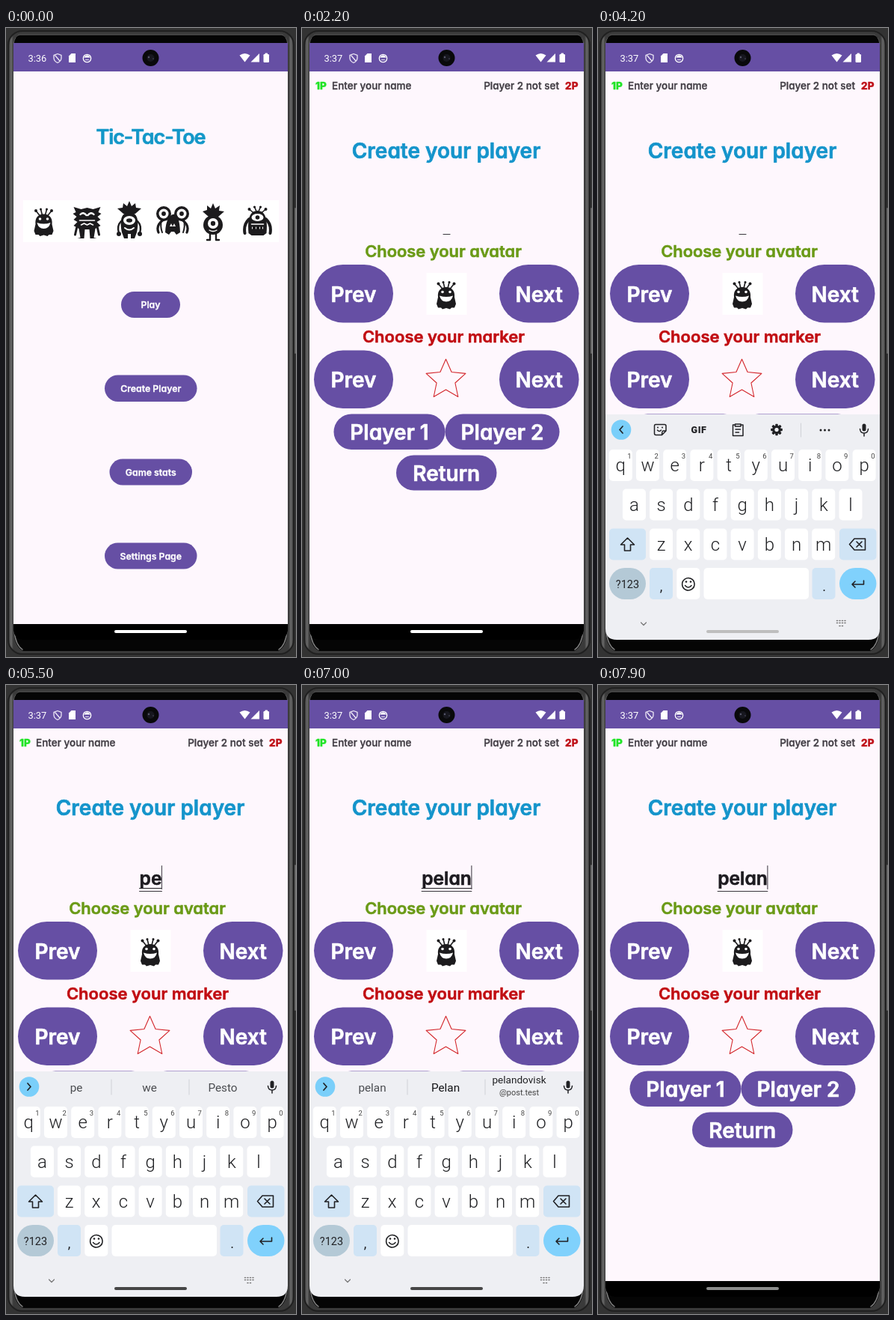
An HTML page for the animation above (8 s loop, 388 px wide and 840 px high).

```html
<!DOCTYPE html>
<html lang="en">
<head>
<meta charset="utf-8">
<title>Tic-Tac-Toe player setup</title>
<style>
html, body { margin: 0; width: 100%; height: 100%; overflow: hidden; background: #333; }
svg { display: block; width: 388px; height: 840px; }
text { white-space: pre; }
.cute { font-family: Inter, "Open Sans", sans-serif; font-weight: 600; font-feature-settings: "cv11"; stroke-width: .025em; stroke-linejoin: round; }
.small { font-weight: 500; }
.badge { font-weight: 800; }
.ui { font-family: Roboto, "Noto Sans", sans-serif; }
.key { font-weight: 300; }
.mid { text-anchor: middle; }
.end { text-anchor: end; }
.line { fill: none; stroke-linecap: round; stroke-linejoin: round; }
</style>
</head>
<body>
<svg id="stage" viewBox="0 0 388 840" xmlns="http://www.w3.org/2000/svg"></svg>
<script>
const LOOP = 8000;
const CX = 193.5;
const PURPLE = '#664fa4', PAGE = '#fef7fd', INK = '#202124', BLUE_KEY = '#d0e4f5';

const rect = (x, y, w, h, r, fill, more = '') =>
  `<rect x="${x}" y="${y}" width="${w}" height="${h}" rx="${r}" fill="${fill}" ${more}/>`;
const dot = (x, y, r, fill) => `<circle cx="${x}" cy="${y}" r="${r}" fill="${fill}"/>`;
const line = (d, color = INK, w = 1.6, more = '') =>
  `<path class="line" d="${d}" stroke="${color}" stroke-width="${w}" ${more}/>`;
const shape = (d, fill = '#1c1b1d') => `<path d="${d}" fill="${fill}"/>`;
const cute = (s, x, y, size, color, cls = 'mid', more = '') =>
  `<text class="cute ${cls}" x="${x}" y="${y}" font-size="${size}" fill="${color}" stroke="${color}" ${more}>${s}</text>`;
const ui = (s, x, y, size, color = INK, cls = 'mid', more = '') =>
  `<text class="ui ${cls}" x="${x}" y="${y}" font-size="${size}" fill="${color}" ${more}>${s}</text>`;
const at = (x, y, body) => `<g transform="translate(${x} ${y})">${body}</g>`;
const button = (s, x, y, w, h, size, base) =>
  rect(x, y, w, h, h / 2, PURPLE) + cute(s, x + w / 2, base, size, '#fff');

// Monsters, each drawn around its own centre
const BLACK = '#1c1b1d';
const stalk = (x1, y1, x2, y2, r) => line(`M${x1} ${y1}L${x2} ${y2}`, BLACK, 1.6) + dot(x2, y2, r, BLACK);
const eye = (x, y, r) => dot(x, y, r, '#fff') + dot(x, y, r * .45, BLACK);
const monsters = [
  stalk(-5, -7, -10.5, -14, 2) + stalk(5, -7, 10.5, -14, 2) +
    stalk(-2, -8, -4, -16, 1.5) + stalk(2, -8, 4, -16, 1.5) +
    shape('M-11 4C-12-5-7-9.500 0-9.500S12-5 11 4L13 13 11 18H7L5 20 0 18.500-5 20-7 18H-11L-13 13Z') +
    dot(-5, -3, 1.8, '#fff') + dot(5, -3, 1.8, '#fff') + shape('M-9 2Q0 5 9 2Q7 10 0 10T-9 2Z', '#fff'),
  shape('M-18-21L-8-18 0-20 8-18 18-21 15-14 19-12 14-8 18-4 13-1 18 4 11 8 9 20 13 21H4L3 9H-3L-4 21H-13L-9 20-11 8-18 4-13-1-18-4-14-8-19-12-15-14Z') +
    line('M-9-11Q-5-15-1-10M9-11Q5-15 1-10', '#fff', 2.4) + line('M-10-3H10M-8 3L-4 1 0 3 4 1 8 3', '#fff', 1.6) +
    line('M-14 7L-16 16M14 7L16 16', BLACK, 3),
  shape('M-8-9L-16-16-9-17-8-23-3-19 0-26 3-19 8-23 9-17 16-16 8-9Z') +
    shape('M-10 16C-14-3-9-11 0-11S14-3 10 16L7 24H2V18H-2V24H-7Z') +
    line('M-11 1Q-17 7-14 17M11 1Q17 7 14 17', BLACK, 2.4) + dot(-14, 18, 3, BLACK) + dot(14, 18, 3, BLACK) +
    `<ellipse cy="0" rx="8" ry="6" fill="#fff"/><ellipse rx="4" ry="2.800" fill="${BLACK}"/>` +
    line('M-6 10Q0 15 6 10', '#fff', 2),
  line('M-12-1Q-23 6-19 16M12-1Q23 6 19 16', BLACK, 3.2) +
    line('M-15 0Q-17 8-14 16M15 0Q17 8 14 16', BLACK, 2) +
    shape('M-10 16Q-9-5 0-8T10 16L5 19 2 15-2 15-5 19Z') +
    dot(-12, -9, 10, BLACK) + dot(12, -9, 10, BLACK) + eye(-12, -9, 6.5) + eye(12, -9, 6.5) +
    shape('M-4 8L-2 4 0 8 2 4 4 8Z', '#fff'),
  shape('M-6-7L-14-14-8-16-8-22-3-18 0-25 3-18 9-22 8-15 15-14 7-7Z') +
    dot(0, 4, 13, BLACK) + eye(0, 2, 7) + line('M-5 11Q0 14 5 11', '#fff', 1.3) +
    line('M-4 16V24H-8M4 16V24H8', BLACK, 2.4),
  stalk(-4, -10, -11, -16, 2) + stalk(4, -10, 11, -16, 2) + stalk(-1, -12, -4, -19, 1.6) + stalk(1, -12, 4, -19, 1.6) +
    shape('M-12 16C-14-6-9-14 0-14S14-6 12 16L8 19H-8Z') +
    line('M-11-3Q-19 4-17 16M11-3Q19 4 17 16', BLACK, 4) +
    `<ellipse cy="-5" rx="8" ry="5" fill="#fff"/>` + dot(0, -5, 2.8, BLACK) +
    line('M-8 4H8', '#fff', 1.6) + line('M-7 8V10M-2 8V10M3 8V10M7 8V10', '#fff', 1),
];

function home() {
  const places = [[50.5, 258], [108.5, 260], [165, 257], [223, 257], [277, 259], [336.5, 258]];
  return rect(10, 58, 367, 738, 0, PAGE) +
    cute('Tic-Tac-Toe', CX, 154.5, 27, '#1297c8', 'mid', 'letter-spacing="-1.1"') +
    rect(23, 230, 342, 56, 0, '#fff') +
    places.map(([x, y], i) => at(x, y, monsters[i])).join('') +
    button('Play', 154, 352, 79, 35, 12.3, 374) +
    button('Create Player', 132, 463.5, 123.5, 35.5, 12.3, 486) +
    button('Game stats', 138.5, 575.5, 110.5, 35, 12.3, 598) +
    button('Settings Page', 132, 687.5, 123.5, 35, 12.3, 710);
}

function star(x, y, outer, inner) {
  const pts = Array.from({ length: 10 }, (_, i) => {
    const a = i * Math.PI / 5 - Math.PI / 2, r = i % 2 ? inner : outer;
    return `${(x + r * Math.cos(a)).toFixed(1)} ${(y + r * Math.sin(a)).toFixed(1)}`;
  });
  return line(`M${pts.join('L')}Z`, '#d3262b', 1.1);
}

function setup() {
  const pair = (y, base) => button('Prev', 16, y, 106, 77.5, 28, base) + button('Next', 264, y, 106.5, 77.5, 28, base);
  return rect(10, 58, 367, 738, 0, PAGE) +
    cute('1P', 18, 82, 13.5, '#1fe425', 'badge') +
    cute('Enter your name', 40, 81.5, 13.5, '#403c43', 'small') +
    cute('Player 2 not set', 344, 81.5, 13.5, '#403c43', 'small end') +
    cute('2P', 369.5, 82, 13.5, '#bf1118', 'badge end') +
    cute('Create your player', 193, 174, 28, '#1494cb') +
    cute('', CX, 266.5, 24.6, '#1d1b20', 'mid', 'id="name"') +
    line('', '#3b383e', 1.1, 'id="under"') + line('', '#1d1b20', 1, 'id="compose"') + line('', '#57535b', 1.2, 'id="caret"') +
    cute('Choose your avatar', 189, 306, 21.9, '#6a9a16') +
    pair(316, 365.5) + rect(166.5, 327, 54, 56, 0, '#fff') + at(193, 355.5, monsters[0]) +
    cute('Choose your marker', 189.5, 420, 22, '#c10d12') +
    pair(430.5, 479.5) + star(192.5, 470, 27.8, 13) +
    button('Player 1', 42.5, 515.5, 149, 47.5, 28, 550) +
    button('Player 2', 191.5, 515.5, 153, 47.5, 28, 550) +
    button('Return', 126, 570.5, 134.5, 47, 28, 604.5);
}

function keyboard() {
  const step = 36.2;
  const key = (cx, y, c) => rect(cx - 15.5, y, 31, 42, 5, '#fff') + ui(c, cx, y + 29, 24, INK, 'mid key');
  const row = (s, x, y) => [...s].map((c, i) => key(x + i * step, y, c)).join('');
  const digits = [...'1234567890'].map((c, i) => ui(c, 42 + i * step, 574.5, 9.5, '#444')).join('');
  const teeth = Array.from({ length: 8 }, (_, i) =>
    `<rect x="-1.7" y="-7.8" width="3.4" height="5" rx=".8" fill="${INK}" transform="rotate(${i * 45})"/>`).join('');
  const tools =
    line('M33 532L29 536.5 33 541', INK, 1.7) +
    line('M77 529.5H89Q91 529.5 91 531.5V538L85.500 543.5H77.500Q75.500 543.5 75.500 541.5V531.5Q75.500 529.5 77 529.5M91 538H87.500Q85.500 538 85.500 543M79.500 537Q82 540 84.500 537', INK, 1.5) +
    dot(80, 533.5, 1, INK) + dot(86, 533.5, 1, INK) +
    ui('GIF', 135, 541, 12.5, INK, 'mid', 'font-weight="800" letter-spacing=".6"') +
    line('M183 530H180.500V544.500H194V530H191.500M183.500 529H191V532H183.500ZM184 536H190.500M184 540H188.500', INK, 1.5) +
    at(239, 536.5, teeth + `<circle r="4.3" fill="none" stroke="${INK}" stroke-width="3"/>`) +
    line('M271.5 528V546', '#cfd1d6', 1) +
    [298, 303.5, 309].map(x => dot(x, 537, 1.5, INK)).join('');
  const words =
    line('M29 532L33 536.5 29 541', INK, 1.7) +
    line('M141 527V547M245 527V547', '#cfd1d6', 1) +
    [94, 192, 290].map(x => ui('', x, 543, 15.3, '#4a4c50', 'mid', 'data-word')).join('') +
    `<g id="mail">${ui('pelandovisk', 290.5, 532, 13.6)}${ui('@post.test', 290.5, 548, 11, '#444')}</g>`;
  return rect(10, 516, 367, 310, 0, '#eeeff3') +
    dot(31, 536.5, 13.3, '#7acffa') +
    `<g id="tools">${tools}</g><g id="words">${words}</g>` +
    rect(353.5, 528.5, 5, 10, 2.5, INK) + line('M350.5 535.5Q351 541 356 541T361.5 535.5M356 541V545', INK, 1.5) +
    row('qwertyuiop', 30.3, 563) + digits + row('asdfghjkl', 48.4, 615.5) + row('zxcvbnm', 84.5, 668.5) +
    rect(15, 668.5, 49, 42, 5, BLUE_KEY) + line('M39.5 681L48.5 690H43.5V698H35.5V690H30.5Z') +
    rect(323, 668.5, 49.5, 42, 5, BLUE_KEY) + line('M343 682H357.5V697H343L336.5 689.5ZM346 686L353 693M353 686L346 693') +
    rect(15, 721, 49, 42, 21, '#b4c9d6') + ui('?123', 39.5, 747.5, 14.5) +
    rect(69, 721, 31, 42, 5, BLUE_KEY) + ui(',', 84.5, 752, 18) +
    rect(105.3, 721, 31, 42, 5, '#fff') + line('M129 742A8.2 8.2 0 1 1 128.99 741.9M116.5 744.5Q120.8 749.5 125 744.5') +
    dot(118, 739.5, 1.3, INK) + dot(124, 739.5, 1.3, INK) +
    rect(141.5, 721, 140.5, 42, 5, '#fff') +
    rect(286.5, 721, 31, 42, 5, BLUE_KEY) + ui('.', 302.5, 752, 18) +
    rect(323, 721, 49.5, 42, 21, '#80d1fc') + line('M355.5 738V743H340M344 739L340 743 344 747') +
    line('M57.5 794L61 797.5 64.5 794', '#777', 1.2) +
    line('M319.5 791.5H332.5M319.5 794.5H332.5M323 798.5H329', '#777', 1.6, 'stroke-dasharray="1 2.5"');
}

function statusBar() {
  return rect(10, 20, 367, 38, 0, PURPLE) +
    ui('', 29.5, 45, 12.9, '#fff', '', 'id="clock"') +
    line('M69 34.5L74 36.3V40.5Q73.5 44.5 69 46.5Q64.5 44.5 64 40.5V36.3ZM66 37L72 44', '#eee9f6', 1.3) +
    shape('M87.5 34H93V46H84V37.5Z', '#fff') +
    `<circle cx="108.5" cy="40.5" r="5.2" fill="none" stroke="#fff" stroke-width="1.3"/>` +
    shape('M104 39.5Q108.5 33 113 39.5Z', '#fff') + line('M106.5 42.5H110.5', '#eee9f6', 1) +
    shape('M312.5 36.5Q319.5 31.5 326.5 36.5L319.5 45.5Z', '#fff') +
    shape('M339 34V45.5H327.5Z', '#fff') +
    rect(344.5, 35, 7.5, 11, 1.2, '#fff') + rect(346.5, 33.5, 3.5, 2, .5, '#fff') +
    dot(CX, 40, 11, '#09090b') + dot(CX, 40, 5, '#17171f') + dot(191, 39, 1.2, '#55556a') + dot(197, 41, .9, '#3c3c4c');
}

function phoneBody() {
  return rect(0, 0, 388, 840, 0, '#333') +
    rect(386, 240, 2, 195, 1, '#696969') +
    rect(3, 4, 382, 832, 19, 'url(#metal)', 'stroke="#202020" stroke-width="2"') +
    shape('M18 9H369Q375 9 377 20V800Q377 826 364 832H23Q10 826 10 800V20Q12 9 18 9Z', '#050505') +
    line('M11 806Q13 824 22 830M376 806Q374 824 365 830', '#858585', 1.5) +
    line('M10 21Q12 10 18 9H369Q375 10 377 21', '#5e5e5e', 1);
}

document.getElementById('stage').innerHTML = `
  <defs>
    <clipPath id="screen"><path d="M10 20H377V802Q377 817 362 817H25Q10 817 10 802Z"/></clipPath>
    <clipPath id="page"><rect x="10" y="58" width="367" height="738"/></clipPath>
    <linearGradient id="metal">
      <stop stop-color="#2c2c2c"/><stop offset=".01" stop-color="#6a6a6a"/><stop offset=".018" stop-color="#3a3a3a"/>
      <stop offset=".982" stop-color="#3a3a3a"/><stop offset=".99" stop-color="#6a6a6a"/><stop offset="1" stop-color="#2c2c2c"/>
    </linearGradient>
  </defs>
  ${phoneBody()}
  <g clip-path="url(#screen)">
    ${rect(10, 20, 367, 797, 0, '#000')}
    <g clip-path="url(#page)">
      ${rect(10, 58, 367, 738, 0, PAGE)}
      <g id="home">${home()}</g>
      <g id="setup">${setup()}</g>
    </g>
    ${statusBar()}
    <g id="keys">${keyboard()}</g>
    ${rect(145, 804, 97, 4, 2, '#fff', 'id="handle"')}
  </g>`;

const el = {};
document.querySelectorAll('[id]').forEach(n => el[n.id] = n);
const wordSlots = document.querySelectorAll('[data-word]');

const clamp = v => Math.max(0, Math.min(1, v));
const span = (t, from, length) => clamp((t - from) / length);
const show = (node, on) => node.setAttribute('visibility', on ? 'inherit' : 'hidden');
const shift = (node, x, y) => node.setAttribute('transform', `translate(${x.toFixed(2)} ${y.toFixed(2)})`);
const latest = (list, t) => list.reduce((found, item) => t >= item[0] ? item : found, list[0]);

// time, typed text, suggestions
const typing = [
  [0, '', []],
  [4800, 'p', ['p', 'o', 'i']],
  [5300, 'pe', ['pe', 'we', 'Pesto']],
  [5900, 'pel', ['pel', 'pelt', 'Pelt']],
  [6400, 'pela', ['pela', 'pelt', 'pets']],
  [6900, 'pelan', ['pelan', 'Pelan', '']],
];
// The caret blinks after focus, stays lit while typing, then blinks again
const caretTimes = [[0, false], [3500, true], [4000, false], [4500, true], [7400, false], [7900, true]];

function draw(t) {
  const p = span(t, 500, 450);
  const ease = 1 - (1 - p) ** 5;
  shift(el.home, -36.7 * ease, 0);
  show(el.home, p < 1);
  shift(el.setup, 36.7 * (1 - ease), 0);
  el.setup.setAttribute('opacity', span(t, 550, 83));
  el.clock.textContent = t < 1000 ? '3:36' : '3:37';

  const rise = (1 - span(t, 3675, 240)) ** 3;
  const fall = span(t, 7400, 220) ** 2;
  const hidden = Math.max(rise, fall);
  shift(el.keys, 0, 300 * hidden);
  show(el.keys, hidden < 1);

  // The handle darkens over the keyboard and lightens again after it leaves
  const dark = span(t, 4060, 400) - span(t, 7750, 400);
  const grey = Math.round(255 - 185 * dark);
  el.handle.setAttribute('fill', `rgb(${grey},${grey},${grey})`);

  const [, typed, words] = latest(typing, t);
  el.name.textContent = typed;
  const width = typed ? el.name.getComputedTextLength() : 9;
  const left = CX - width / 2, right = CX + width / 2;
  const caretX = typed ? right : left;
  el.under.setAttribute('d', `M${left} 275.5H${right}`);
  el.compose.setAttribute('d', `M${left} 271.5H${right}`);
  show(el.compose, typed && t < 7400);
  el.caret.setAttribute('d', `M${caretX} 241.5V272.5`);
  show(el.caret, latest(caretTimes, t)[1]);

  const done = typed.length === 5;
  show(el.tools, !typed);
  show(el.words, !!typed);
  wordSlots.forEach((slot, i) => slot.textContent = words[i] || '');
  wordSlots[1].setAttribute('fill', done ? '#151619' : '#4a4c50');
  show(el.mail, done);
}

function tick() {
  draw(performance.now() % LOOP);
  requestAnimationFrame(tick);
}
tick();
</script>
</body>
</html>
```
